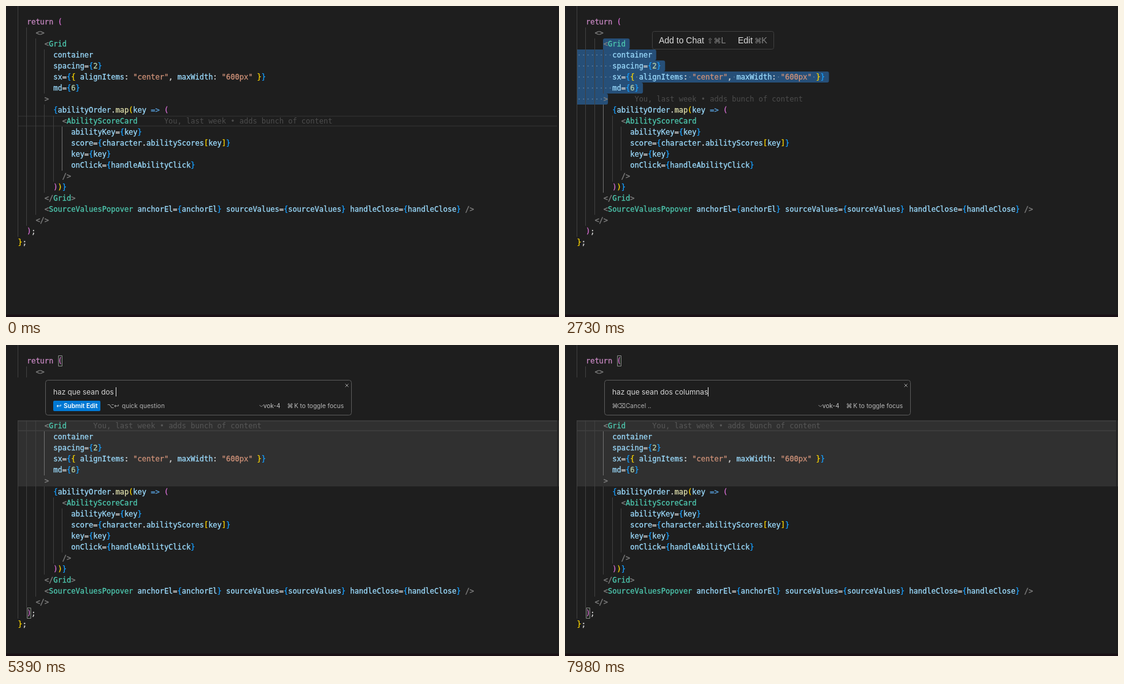
An HTML page with a canvas for the animation above (8000 ms loop, 902x508 px).

```html
<!DOCTYPE html>
<html lang="en">
<head>
<meta charset="utf-8">
<title>Inline edit</title>
<style>
  html, body { margin: 0; height: 100%; overflow: hidden; background: #1e1e1e; }
  canvas { display: block; }
</style>
</head>
<body>
<canvas id="stage" width="902" height="508"></canvas>
<script>
const ctx = document.getElementById('stage').getContext('2d');
const LOOP = 8000, LEFT = 19.5, CHAR = 7.224, ROW = 18, TOP = 17;
const MONO = '12px "DejaVu Sans Mono", monospace';
const UI = 'Inter, sans-serif';
const SMALL = '10.1px ' + UI, INPUT = '11.85px ' + UI;
const POPUP = '14px "Liberation Sans", sans-serif';
const OPEN_AT = 3080, SUBMIT_AT = 7840;

const source = `  return (
    <>
      <Grid
        container
        spacing={2}
        sx={{ alignItems: "center", maxWidth: "600px" }}
        md={6}
      >
        {abilityOrder.map(key => (
          <AbilityScoreCard
            abilityKey={key}
            score={character.abilityScores[key]}
            key={key}
            onClick={handleAbilityClick}
          />
        ))}
      </Grid>
      <SourceValuesPopover anchorEl={anchorEl} sourceValues={sourceValues} handleClose={handleClose} />
    </>
  );
};`.split('\n');
const blame = 'You, last week • adds bunch of content';

// Syntax colouring; bracket colours follow the nesting depth.
const bracketColors = ['#ffd700', '#da70d6', '#179fff'];
let depth = 1;
function tokenColor(s) {
  if (/^[{([]/.test(s)) return bracketColors[depth++ % 3];
  if (/^[\])}]/.test(s)) return bracketColors[--depth % 3];
  if (s === '=>') return '#569cd6';
  if (s[0] === '"') return '#ce9178';
  if (/[<>]/.test(s)) return '#808080';
  if (s === 'return') return '#c586c0';
  if (s === 'map') return '#dcdcaa';
  if (/^\d/.test(s)) return '#b5cea8';
  if (/^[A-Z]/.test(s)) return '#4ec9b0';
  return /\w/.test(s) ? '#9cdcfe' : '#d4d4d4';
}
const tokens = source.map(line =>
  [...line.matchAll(/"[^"]*"|=>|<\/?|\/?>|\w+|\S/g)]
    .map(m => ({ text: m[0], col: m.index, color: tokenColor(m[0]) })));

// Indent guides: column, first row, last row
const guides = [[0, -1, 19], [2, 1, 18], [4, 2, 17], [6, 3, 6], [6, 8, 15], [8, 9, 14], [10, 10, 13]];

// Selection end: time, row, column
const drag = [[980, 2, 6], [1260, 2, 9], [1400, 3, 9], [1540, 4, 9], [1680, 5, 9], [1890, 6, 9], [1960, 7, 7]];

const prompt = 'haz que sean dos columnas';
const keyTimes = [
  3360, 3430, 3500, 3640, 3780, 3920, 4060, 4130,
  4410, 4550, 4620, 4760, 4900, 5040, 5180, 5250, 5390,
  5530, 5670, 5810, 5950, 6160, 6300, 6510, 6580];

const colX = col => LEFT + col * CHAR;

function rect(x, y, w, h, color) {
  ctx.fillStyle = color;
  ctx.fillRect(x, y, w, h);
}

function box(x, y, w, h, radius, fill, stroke) {
  ctx.beginPath();
  ctx.roundRect(x, y, w, h, radius);
  if (fill) { ctx.fillStyle = fill; ctx.fill(); }
  if (stroke) { ctx.strokeStyle = stroke; ctx.lineWidth = 1; ctx.stroke(); }
}

function text(s, x, y, font, color, align = 'left') {
  ctx.font = font;
  ctx.fillStyle = color;
  ctx.textAlign = align;
  ctx.fillText(s, x, y);
}

function icon(s, x, y, size, color) {
  text(s, x, y, size + 'px "DejaVu Sans", sans-serif', color, 'center');
}

function line(color, ...points) {
  ctx.beginPath();
  points.forEach(([x, y]) => ctx.lineTo(x, y));
  ctx.strokeStyle = color;
  ctx.lineWidth = 1;
  ctx.stroke();
}

function drawSelection(endRow, endCol, rowY) {
  for (let r = 2; r <= endRow; r++) {
    const from = r === 2 ? 6 : 0;
    const to = r === endRow ? endCol : source[r].length;
    const x = r === 2 ? 62 : 19.5;
    const right = colX(to) + (r < endRow ? 6.5 : 0);
    box(x, rowY(r), right - x, ROW, [r === 2 ? 3 : 0, 3, 3, 0], '#264f78');
    for (let c = from; c < to; c++) {
      if (source[r][c] === ' ') box(colX(c) + 2.6, rowY(r) + 8, 2, 2, 1, '#557899');
    }
  }
}

function drawEditor(t) {
  const open = t >= OPEN_AT;
  const rowY = r => TOP + r * ROW + (open && r > 1 ? 70 : 0);
  const [, row, col] = drag.findLast(d => t >= d[0]) || [0, 9, 27];
  const selecting = t >= 1260 && !open;
  const cursorRow = open ? 2 : row;

  if (open) rect(19, rowY(2), 883, 6 * ROW, '#303030');
  if (selecting) {
    drawSelection(row, col, rowY);
  } else {
    const y = rowY(cursorRow), tint = 'rgba(255,255,255,.05)';
    rect(19, y, 880, 2, tint);
    rect(19, y + ROW - 2, 880, 2, tint);
  }

  const activeStart = cursorRow === 9 ? 10 : cursorRow === 7 ? 8 : 3;
  for (const [c, first, last] of guides) {
    const color = first === activeStart ? '#707070' : '#404040';
    for (let r = first; r <= last; r++) rect(Math.floor(colX(c)), rowY(r), 1, ROW, color);
  }

  if (open || (t >= 980 && !selecting)) {
    for (const [r, c] of [[0, 9], [19, 2]]) {
      box(Math.round(colX(c)) + .5, rowY(r) + .5, 6, 17, 0, 'rgba(0,100,0,.1)', '#888');
    }
  }

  ctx.lineWidth = .3;
  tokens.forEach((list, r) => list.forEach(k => {
    text(k.text, colX(k.col), rowY(r) + 13, MONO, k.color);
    ctx.strokeStyle = k.color;
    ctx.strokeText(k.text, colX(k.col), rowY(r) + 13);
  }));

  if (t < 980 || (t >= 2310 && t < OPEN_AT) || t >= 3360) {
    text(blame, colX(source[cursorRow].length + 6), rowY(cursorRow) + 13, MONO, 'rgba(153,153,153,.38)');
  }
  if (t >= 980 && t < 2730) rect(Math.floor(colX(col)) - 1, rowY(row), 2, ROW, '#d0d0d0');
}

function drawPopup(t) {
  ctx.globalAlpha = Math.min(1, (t - 2240) / 210);
  box(142.5, 41.5, 198, 29, 3, '#1e1e1e', '#3f3f3f');
  text('Add to Chat', 153, 61, POPUP, '#dcdcdc');
  icon('⇧', 237, 61, 12, '#858585');
  icon('⌘', 248.5, 61, 12, '#858585');
  text('L', 254.5, 61, POPUP, '#858585');
  text('Edit', 282, 61, POPUP, '#dcdcdc');
  icon('⌘', 315, 61, 12, '#858585');
  text('K', 320.5, 61, POPUP, '#858585');
  ctx.globalAlpha = 1;
}

function drawActions(t, typed) {
  const gray = '#b0b0b0';
  if (!typed) {
    text('Esc to close', 77, 103, SMALL, gray);
  } else if (t < SUBMIT_AT) {
    box(77, 91, 77, 17, 2, '#0078d4');
    icon('↩', 86.5, 103, 10, '#fff');
    text('Submit Edit', 94, 103, '600 ' + SMALL, '#fff');
    icon('⌥', 170.5, 103, 10, gray);
    icon('↩', 180.5, 103, 10, gray);
    text('quick question', 189, 103, SMALL, gray);
  } else {
    icon('⌘', 81.5, 103, 10, gray);
    icon('⌫', 91.5, 103, 10, gray);
    text(t < 7980 ? 'Cancel .' : 'Cancel ..', 99, 103, SMALL, gray);
  }
}

function drawPrompt(t) {
  const typed = keyTimes.filter(k => t >= k).length;
  const entered = prompt.slice(0, typed);
  box(64.5, 57.5, 499, 57, 4, '#1e1e1e', '#5a5a5a');
  line('#a0a0a0', [553.5, 63.5], [558.5, 68.5]);
  line('#a0a0a0', [558.5, 63.5], [553.5, 68.5]);

  if (typed) {
    text(entered, 77, 81, INPUT, '#d4d4d4');
  } else {
    text('Editing instructions... (', 77, 81, INPUT, '#999');
    icon('⇅', 211, 81, 12, '#bbb');
    text('for history, @ for code / documentation)', 447, 81, INPUT, '#999', 'right');
  }
  const lastKey = typed ? keyTimes[typed - 1] : OPEN_AT;
  if (Math.floor((t - lastKey) / 490) % 2 === 0) {
    ctx.font = INPUT;
    rect(Math.round(77 + ctx.measureText(entered).width), 69, 1, 15, '#e0e0e0');
  }

  drawActions(t, typed);
  line('#909090', [413.5, 98], [416.5, 101], [419.5, 98]);
  text('vok-4', 447.5, 103, SMALL, '#c0c0c0', 'right');
  icon('⌘', 463.5, 103, 10, '#b8b8b8');
  text('K to toggle focus', 551, 103, SMALL, '#b8b8b8', 'right');
}

function draw() {
  const t = performance.now() % LOOP;
  rect(0, 0, 902, 508, '#1e1e1e');
  drawEditor(t);
  if (t >= OPEN_AT) drawPrompt(t);
  else if (t >= 2310) drawPopup(t);
  rect(899, 0, 1, 504, '#1a1a1a');
  rect(0, 504, 902, 4, '#1a1116');
  requestAnimationFrame(draw);
}
draw();
</script>
</body>
</html>
```
